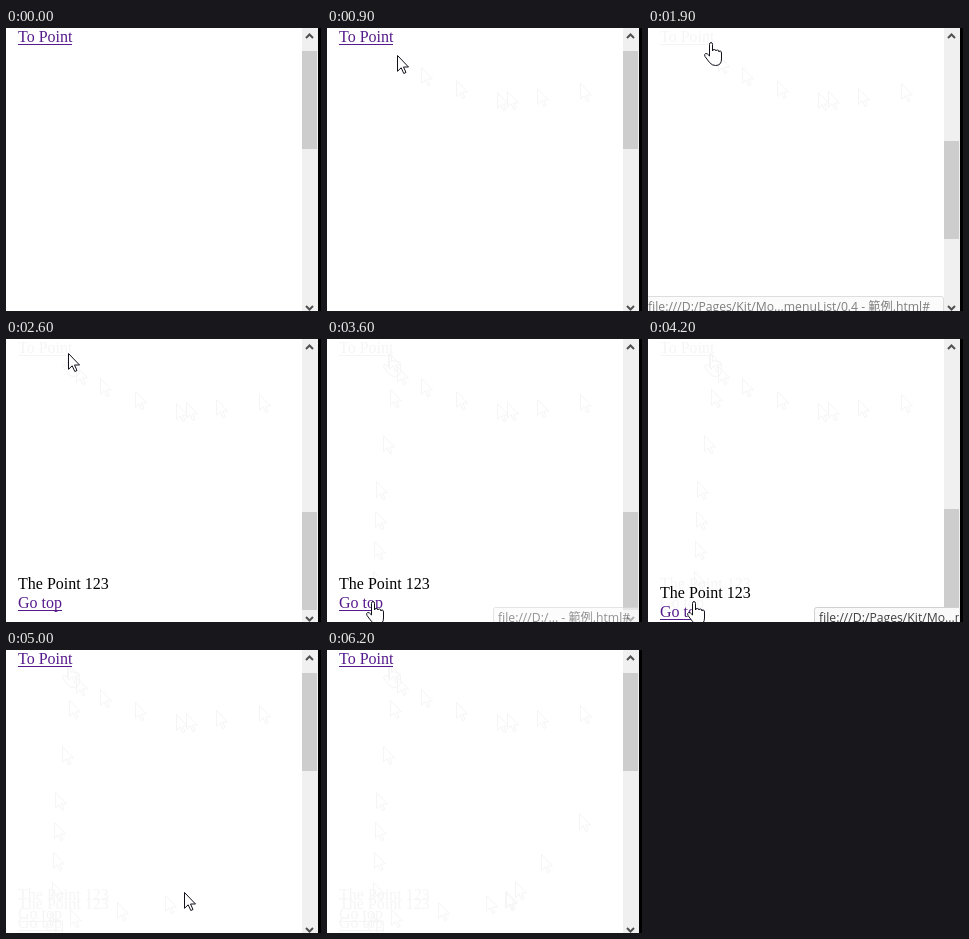
Recreate the animation shown at these times as an HTML page with a canvas. Size 315x283 px, loop 6.3 s.

```html
<!DOCTYPE html>
<html lang="en">
<head>
<meta charset="utf-8">
<title>Anchor scroll</title>
<style>
html, body { margin: 0; width: 100%; height: 100%; overflow: hidden; background: #fff; }
canvas { display: block; }
</style>
</head>
<body>
<canvas id="stage" width="315" height="283"></canvas>
<script>
const ctx = document.getElementById('stage').getContext('2d');
const W = 315, H = 283, LOOP = 6300, STEP = 100;
const PAGE_W = 296, MAX_SCROLL = 433;
const ENTER = 200, LEAVE = 5600;
const PURPLE = '#551a8b', RED = '#ee0000', TRAIL = '#f5f5f6';
const SERIF = '16px "Liberation Serif", "Times New Roman", serif';
const SANS = '12.2px "Open Sans", "Noto Sans CJK TC", "Noto Sans CJK JP", sans-serif';
const SHORT_URL = 'file:///D:/... - 範例.html#';
const LONG_URL = 'file:///D:/Pages/Kit/Mo...menuList/0.4 - 範例.html#';

const arrow = new Path2D('M.5 .5V16.3L4.2 12.8L6.8 18.5L9 17.5L6.5 12H11.5Z');
const hand = new Path2D('M5.5 14V2.5Q5.5 .5 7 .5T8.5 2.5V9Q8.5 7.5 10.2 7.5T12 9Q12 8 13.5 8T15 10' +
  'Q15 9 16.2 9T17.5 11V17Q17.5 23.5 11.5 23.5Q8 23.5 5.5 20.5L1 14.5Q0 12.2 1.5 11.5Q3.2 11 5.5 14Z');

const clamp = v => Math.max(0, Math.min(1, v));
const ramp = (t, from, to) => clamp((t - from) / (to - from));
const between = (t, from, to) => t >= from && t < to;
const linear = k => k;
const swing = k => 0.5 - Math.cos(k * Math.PI) / 2;
const easeIn = k => 1 - Math.cos(k * Math.PI / 2);
const easeOut = k => Math.sin(k * Math.PI / 2);

// Pointer stops; the easing leads up to each stop.
const stop = (t, x, y, easeX = linear, easeY = easeX) => ({ t, x, y, easeX, easeY });
const stops = [
  stop(ENTER, 305, 50),
  stop(600, 170, 64, easeOut),
  stop(1000, 62, 14, easeOut, linear),
  stop(2600, 62, 14),
  stop(2700, 63, 50),
  stop(2900, 49, 142),
  stop(3300, 45, 262),
  stop(4600, 45, 262),
  stop(5000, 178, 242, swing),
  stop(5100, 179, 241),
  stop(5500, 297, 115, easeIn)
];

function pointerAt(t) {
  const i = stops.findIndex(s => s.t >= t);
  const b = i < 0 ? stops[stops.length - 1] : stops[i];
  const a = stops[i - 1] || b;
  const k = a === b ? 1 : ramp(t, a.t, b.t);
  return {
    x: Math.round(a.x + (b.x - a.x) * b.easeX(k)),
    y: Math.round(a.y + (b.y - a.y) * b.easeY(k)),
    over: between(t, 1000, 2600) || between(t, 3300, 4700)
  };
}

function scrollAt(t) {
  return Math.round(MAX_SCROLL * (swing(ramp(t, 1640, 2100)) - swing(ramp(t, 4126, 4926))));
}

function text(str, base, color, underlined) {
  ctx.font = SERIF;
  ctx.fillStyle = color;
  ctx.fillText(str, 12, base);
  if (underlined) ctx.fillRect(12, base + 2, Math.round(ctx.measureText(str).width), 1);
}

function pointText(y, color, linkColor) {
  text('The Point 123', 250 + y, color);
  text('Go top', 269 + y, linkColor, true);
}

function drawPointer({ x, y, over }, isTrail) {
  const path = over ? hand : arrow;
  ctx.save();
  ctx.translate(over ? x - 6 : x, y);
  ctx.lineWidth = 1;
  ctx.strokeStyle = isTrail ? TRAIL : '#11111c';
  if (!isTrail) {
    ctx.fillStyle = '#fff';
    ctx.fill(path);
  }
  ctx.stroke(path);
  ctx.restore();
}

// A faint outline stays wherever the pointer has moved on.
function trail(t) {
  for (let s = ENTER; s < Math.min(t, LEAVE); s += STEP) {
    const p = pointerAt(s), next = pointerAt(s + STEP);
    if (p.x !== next.x || p.y !== next.y || p.over !== next.over) drawPointer(p, true);
  }
}

function page(t, scroll) {
  ctx.save();
  ctx.beginPath();
  ctx.rect(0, 0, PAGE_W, H);
  ctx.clip();
  trail(t);
  if (between(t, 1700, 4900)) text('To Point', 14, TRAIL, true);
  if (t >= 4200) pointText(0, TRAIL, TRAIL);
  if (t >= 4300) pointText(9, TRAIL, TRAIL);
  text('To Point', 14 - scroll, between(t, 1500, 1700) ? RED : PURPLE, true);
  pointText(MAX_SCROLL - scroll, '#000', between(t, 4000, 4200) ? RED : PURPLE);
  ctx.restore();
}

function chevron(y, dir) {
  ctx.beginPath();
  ctx.moveTo(300, y + 2 * dir);
  ctx.lineTo(303.5, y - 1.5 * dir);
  ctx.lineTo(307, y + 2 * dir);
  ctx.stroke();
}

function scrollbar(scroll) {
  ctx.fillStyle = '#f0f0f0';
  ctx.fillRect(PAGE_W, 0, 16, H);
  ctx.fillStyle = '#cdcdcd';
  ctx.fillRect(PAGE_W, 23 + Math.round(150 * scroll / MAX_SCROLL), 15, 98);
  ctx.strokeStyle = '#505050';
  ctx.lineWidth = 2;
  chevron(8, 1);
  chevron(280, -1);
}

function statusBar(x, w, url, alpha) {
  ctx.save();
  ctx.beginPath();
  ctx.rect(0, 0, 311, H);
  ctx.clip();
  ctx.globalAlpha = alpha;
  ctx.beginPath();
  ctx.roundRect(x + 0.5, 268.5, w, 24, 2);
  ctx.fillStyle = '#f9f9f9';
  ctx.fill();
  ctx.strokeStyle = '#d0d0d0';
  ctx.lineWidth = 1;
  ctx.stroke();
  ctx.clip();
  ctx.font = SANS;
  ctx.fillStyle = '#404040';
  ctx.fillText(url, x + 5, 283);
  ctx.restore();
}

function status(t) {
  if (t < 2200) {
    const grow = ramp(t, 1200, 1500);
    statusBar(-5, 145 + 155 * grow, grow > 0 ? LONG_URL : SHORT_URL,
      ramp(t, 900, 1200) - ramp(t, 1800, 2100));
  } else {
    const wide = t >= 4200;
    statusBar(166, wide ? 300 : 145, wide ? LONG_URL : SHORT_URL,
      ramp(t, 3300, 3700) ** 2 - ramp(t, 4300, 4600));
  }
}

function draw(t) {
  const scroll = scrollAt(t);
  ctx.fillStyle = '#fff';
  ctx.fillRect(0, 0, W, H);
  page(t, scroll);
  scrollbar(scroll);
  status(t);
  ctx.fillStyle = '#000';
  ctx.fillRect(312, 0, 3, H);
  if (between(t, ENTER, LEAVE)) drawPointer(pointerAt(t));
}

const start = performance.now();
function tick() {
  const t = (performance.now() - start) % LOOP;
  draw(Math.floor(t / STEP) * STEP);
  requestAnimationFrame(tick);
}
tick();
</script>
</body>
</html>
```
